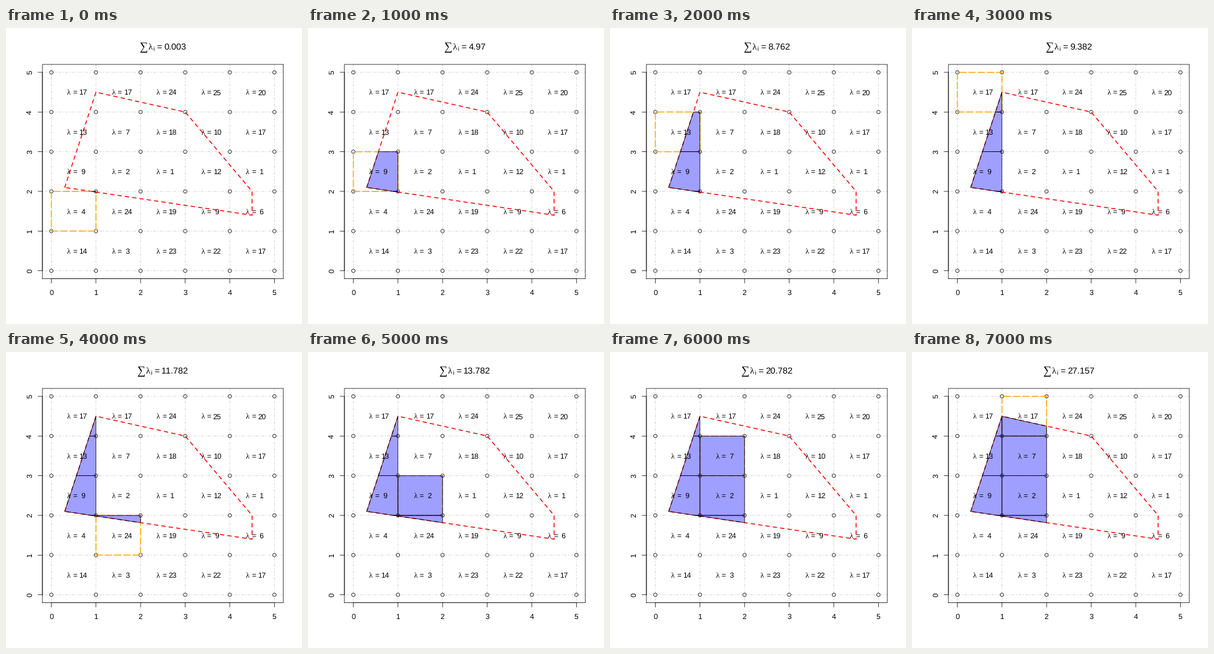
A matplotlib script that plays this animation: 480 px wide and 480 px high, repeating every 8 s.

```python
import matplotlib.pyplot as plt
from matplotlib.animation import FuncAnimation
from matplotlib.patches import Circle, Polygon

# Keep glyphs at their natural advance widths
plt.rcParams["text.hinting"] = "none"
plt.rcParams["text.kerning_factor"] = 6

SIZE, DPI = 480, 96
PT = 72 / DPI                      # points per pixel
THIN, THICK = 0.75 * PT, 1.5 * PT
LEFT, RIGHT, TOP, BOTTOM = 59.04, 449.76, 59.04, 406.56
SANS, SERIF = "Liberation Sans", "Liberation Serif"
DASH, LONG_DASH, DOT_DASH = (4, 4), (7, 3), (1, 3, 4, 3)

# Rates per cell, bottom row first
RATES = [
    [14, 3, 23, 22, 17],
    [4, 24, 19, 9, 6],
    [9, 2, 1, 12, 1],
    [13, 7, 18, 10, 17],
    [17, 17, 24, 25, 20],
]
REGION = [(0.3, 2.1), (1, 4.5), (3, 4), (4.5, 2), (4.5, 1.4)]
STEPS = [(col, row) for col in (0, 1) for row in (1, 2, 3, 4)]


def px(x):
    return LEFT + (RIGHT - LEFT) * (x + 0.2) / 5.4


def py(y):
    return BOTTOM - (BOTTOM - TOP) * (y + 0.2) / 5.4


def to_pixels(points):
    return [(px(x), py(y)) for x, y in points]


def clip_half(points, axis, limit, sign):
    """Keep the part of a polygon where sign * (coord - limit) >= 0."""
    out = []
    for a, b in zip(points, points[1:] + points[:1]):
        da, db = sign * (a[axis] - limit), sign * (b[axis] - limit)
        if da >= 0:
            out.append(a)
        if da * db < 0:
            t = da / (da - db)
            out.append((a[0] + t * (b[0] - a[0]), a[1] + t * (b[1] - a[1])))
    return out


def clip_cell(points, col, row):
    for axis, low in ((0, col), (1, row)):
        points = clip_half(points, axis, low, 1)
        points = clip_half(points, axis, low + 1, -1)
    return points


def area(points):
    pairs = zip(points, points[1:] + points[:1])
    return abs(sum(a[0] * b[1] - b[0] * a[1] for a, b in pairs)) / 2


fig = plt.figure(figsize=(SIZE / DPI, SIZE / DPI), dpi=DPI, facecolor="white")
ax = fig.add_axes([0, 0, 1, 1])
ax.set_xlim(0, SIZE)
ax.set_ylim(SIZE, 0)
ax.axis("off")


def line(xs, ys, color="black", lw=THIN, z=2, **kw):
    return ax.plot(xs, ys, color=color, lw=lw, zorder=z, snap=False,
                   solid_capstyle="round", dash_capstyle="round", **kw)[0]


def label(x, y, s, size=12, family=SANS, **kw):
    return ax.text(x, y, s, fontsize=size * PT, family=family, color="black",
                   va="baseline", zorder=8, **kw)


def outline(points, color, dash, z):
    patch = Polygon(points, closed=True, fill=False, ec=color, lw=THICK,
                    ls=(0, dash), capstyle="round", joinstyle="round",
                    zorder=z, snap=False)
    return ax.add_patch(patch)


# Grid, frame, axes
grid = dict(color="lightgray", lw=PT, z=1, ls=(0, DOT_DASH))
for k in range(6):
    line([px(k)] * 2, [BOTTOM, TOP], **grid)
    line([LEFT, RIGHT], [py(k)] * 2, **grid)
    line([px(k)] * 2, [BOTTOM, BOTTOM + 7.2])
    line([LEFT, LEFT - 7.2], [py(k)] * 2)
    label(px(k), 433, str(k), ha="center")
    label(42, py(k), str(k), ha="center", rotation=90, rotation_mode="anchor")
line([LEFT, RIGHT, RIGHT, LEFT, LEFT], [BOTTOM, BOTTOM, TOP, TOP, BOTTOM])
line([px(0), px(5)], [BOTTOM] * 2)
line([LEFT] * 2, [py(0), py(5)])

for i in range(6):
    for j in range(6):
        ax.add_patch(Circle((px(i), py(j)), 2.8, fill=False, ec="black",
                            lw=THIN, zorder=2))

for row, rates in enumerate(RATES):
    for col, rate in enumerate(rates):
        start, base = px(col + 0.35), py(row + 0.5) + 4.4
        label(start + 0.3, base, "λ", family=SERIF)
        label(start + 9.7, base, "=")
        label(start + 19.7, base, f"{rate:2d}")

outline(to_pixels(REGION), "red", DASH, 4)

# One cell outline and one covered piece per step, with the running sum
cells, pieces, sums = [], [], []
total = 0
for n, (col, row) in enumerate(STEPS):
    corners = [(col, row), (col + 1, row), (col + 1, row + 1), (col, row + 1)]
    cells.append(outline(to_pixels(corners), "orange", LONG_DASH, 5))
    part = clip_cell(REGION, col, row)
    piece = Polygon(to_pixels(part), closed=True, fc=(0, 0, 1, 0.375),
                    ec="black", lw=THIN, joinstyle="round",
                    zorder=6 + n / 10, snap=False)
    pieces.append(ax.add_patch(piece))
    total += area(part) * RATES[row][col]
    sums.append(f"{round(total, 3):g}")

# Title parts: offset from the left end and text
title_parts = [
    (0, label(0, 36, "∑", 18.5, SERIF)),
    (14, label(0, 35, "λ", 14.4, SERIF)),
    (21.6, label(0, 37.4, "i", 10)),
    (28, label(0, 35, "=", 14.4)),
    (39.6, label(0, 35, "", 14.4)),
]


def draw(n):
    for k, (cell, piece) in enumerate(zip(cells, pieces)):
        cell.set_visible(k == n)
        piece.set_visible(k <= n)
    number = sums[n]
    width = 39.6 + 8.008 * (len(number) - 1) + 4
    start = (LEFT + RIGHT - width) / 2
    for offset, part in title_parts:
        part.set_x(start + offset)
    title_parts[-1][1].set_text(number)
    return cells + pieces + [part for _, part in title_parts]


anim = FuncAnimation(fig, draw, frames=len(STEPS), init_func=lambda: draw(0),
                     interval=1000, repeat=True, repeat_delay=0, blit=False)
plt.show()
```
